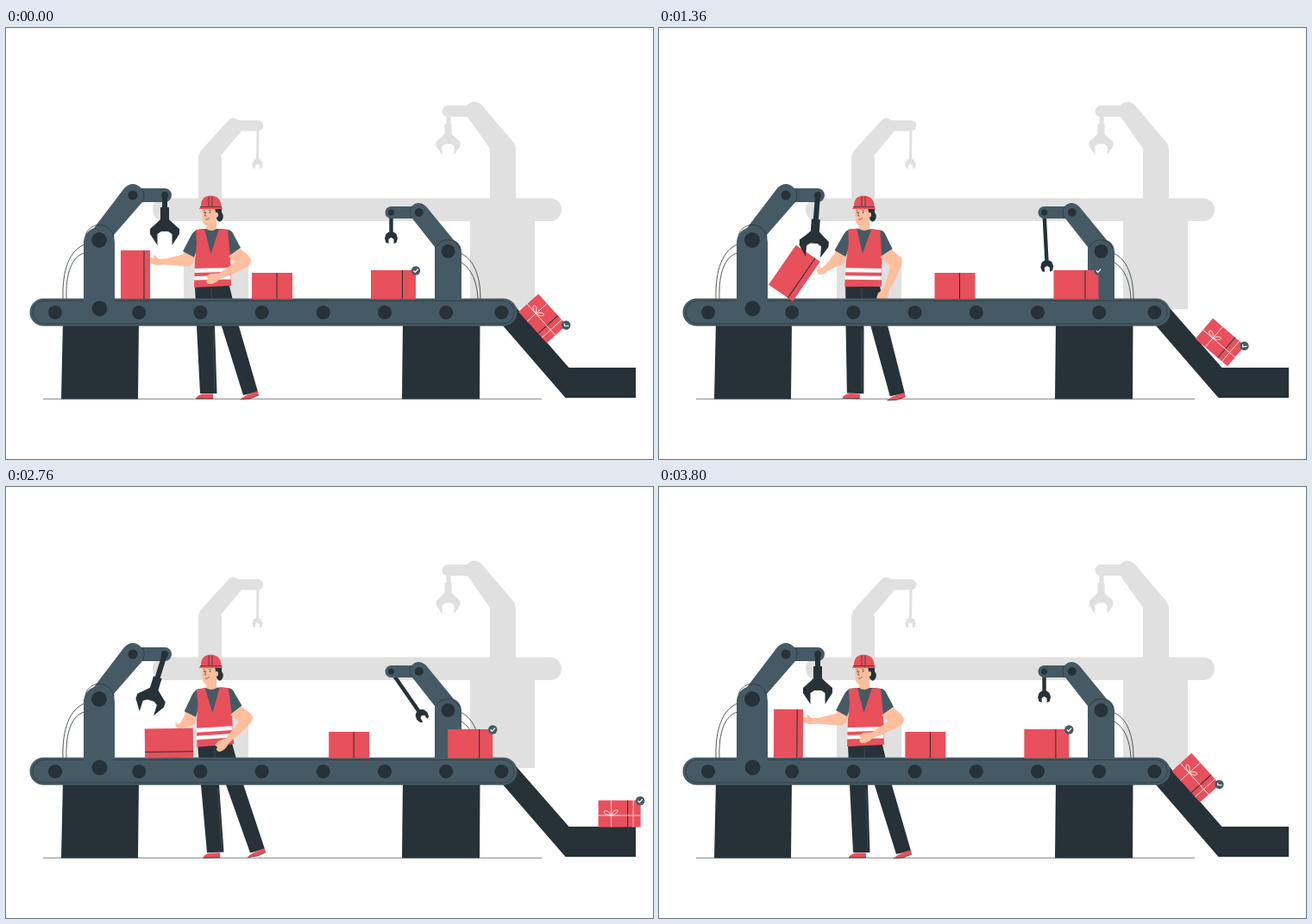
Recreate the animation shown at these times as an HTML page. Size 750x500 px, loop 3840 ms.

```html
<!DOCTYPE html>
<html lang="en">
<head>
<meta charset="utf-8">
<title>Assembly line</title>
<style>
  html, body { margin: 0; width: 100%; height: 100%; overflow: hidden; background: #fff; }
  svg { display: block; width: 750px; height: 500px; }
  .dark { fill: #263238; }
  .slate { fill: #455a64; }
  .red { fill: #e8505b; }
  .pale { fill: #e0e0e0; }
  .skin { fill: #ffbe9d; }
  .white { fill: #fff; }
  .line { fill: none; stroke: #263238; }
  .ribbon { fill: none; stroke: #fff; }
</style>
</head>
<body>
<svg viewBox="0 0 750 500">
  <defs>
    <path id="claw" d="M-5 14H5V28L9 32L17 39V45L8.5 58V45L4 42H-4L-8.5 45V58L-17 45V39L-9 32L-5 28Z"/>
    <path id="jaw" d="M-7.5 1L-6-4Q-3-7 0-7Q3-7 6-4L7.500 1L6 6L3 7V2L0 0L-3 2V7L-6 6Z"/>
    <g id="badge">
      <circle class="slate" r="5.2"/>
      <path class="ribbon" d="M-2.6 0L-.7 1.8L2.7-1.8" stroke-width="1.2"/>
    </g>
  </defs>

  <!-- background machine -->
  <g class="pale">
    <rect x="170" y="197.5" width="474" height="26.5" rx="13.2"/>
    <rect x="206" y="265" width="75" height="52"/>
    <rect x="538" y="220" width="75" height="106"/>
    <path d="M223 200V152Q223 145 228 140L259 106Q263 102 269 107H292A6 6 0 0 1 292 119.500H273L249 148Q250 150 250 153V200Z"/>
    <path d="M290.500 118H293.500L293 153H290Z"/>
    <use href="#jaw" transform="translate(291.5 157.500) scale(.82)"/>
    <path d="M561 200V140L535 103H512A6.500 6.500 0 0 1 512 90H534Q543 81 552 90L586 130Q591 135 591 142V200Z"/>
    <rect x="510.5" y="102" width="5" height="12"/>
    <use href="#claw" transform="translate(512.5 100) scale(.82)"/>
  </g>

  <path class="line" d="M43 430.3H621" stroke-width=".6"/>

  <!-- worker -->
  <g id="body">
    <path class="dark" d="M219 299H259L270 346L292 422L275 426L250 346L243 322L242 346L244.500 424H225L221 346Z"/>
    <path class="line" d="M238 302L238.500 314M240 350L242 420" style="stroke:#455a64" stroke-width=".6"/>
    <path class="red" d="M220 430Q221 426 228 424.500H240V430ZM272 431Q275 427 284 424L292 421L293 426L283 430Z"/>
    <path class="line" d="M220 430H240M272 431L283 430L293 426" stroke-width=".7"/>
    <path class="skin" d="M207 257L220 260L217 273Q212 279 206 275Q202 271 205 264Z"/>
    <path id="reach" class="skin" d="M-1-7L-23-1.500L-32-1L-36-5Q-39-6-37-2L-42-3V4L-35 6L-25 5.500L0 7.500Q7 6 7-1Z"/>
    <path class="slate" d="M222 234L230 233H249L258 234Q262 235 264 240L272 255L258 265L250 270H225L223 252L218 266L205 259L215 240Q218 235 222 234Z"/>
    <path class="red" d="M220 234L230 233L237.500 262L247 233L257 234L260 265L261 299L218 301L219 270L221 250Z"/>
    <path class="white" d="M218.500 279L260 278.200V283L218.400 284ZM218.300 288L260.500 287V291.500L218.200 292.500Z"/>
    <path class="skin" d="M258 265L271.500 256L281 264L278 276L268 273Z"/>
    <path id="forearm" class="skin" d="M281 264Q287 270 281 276Q272 282 248 291Q242 298 234 297L232 294L234 291L232 288L237 285L247 284.500L267 271L272 262Z"/>
  </g>

  <!-- head -->
  <path class="skin" d="M233 222H244V233Q238 237 232 233Z"/>
  <path class="dark" d="M241 208H250V214Q253 217 251 222Q248 227 245 223L243 219Z"/>
  <path class="skin" d="M227 208H242L243 214Q246 213 246 217Q246 220 243 220Q242 228 235 229Q229 230 228 224Z"/>
  <path class="line" d="M228.500 212L230.500 211.500M235 211.500L238 212M232 213L230.500 218H232.500M231 222Q234 223 236 220" stroke-width=".6"/>
  <circle class="dark" cx="230" cy="214" r=".8"/>
  <circle class="dark" cx="236.5" cy="214" r=".8"/>
  <path class="red" d="M226 206Q226 195 237 194.500Q249 195 249.500 206L251 210H224Z"/>
  <path class="line" d="M225 207.500H250M235 207V195.500M239 207V195.500" stroke-width=".7"/>

  <!-- cables -->
  <path class="line" d="M66 314C65 280 74 258 91 251M70 314C69 285 76 265 91 261M550 314C550 288 542 268 528 262M547 314C546 294 540 280 528 272" stroke-width=".8"/>

  <!-- supports and chute -->
  <path class="dark" d="M66 340H154L153 430.500H64ZM460 340H549.500L549 430.500H459ZM586 318L652.500 394H730V429H648.500L574 343Z"/>

  <!-- gift on the chute -->
  <g id="gift">
    <rect class="red" x="-24.5" y="-15.5" width="49" height="31"/>
    <path class="line" d="M9.500-15.500V15.500"/>
    <path class="ribbon" d="M-9.500-15.500V15.500M-24.500 2H24.500M16-15.500V15.500M-9.500 2Q-19 1-18-3Q-14-5-9.500 2Q-6-6-2-4Q-2 0-9.500 2" stroke-width=".8"/>
    <use href="#badge" x="24" y="-15"/>
  </g>

  <!-- conveyor -->
  <rect class="slate" x="27.500" y="313.700" width="565" height="32" rx="16"/>
  <rect class="line" x="31" y="316.500" width="558" height="26.500" rx="13" stroke-width=".6"/>
  <g id="rollers" class="dark"></g>

  <!-- robot arms -->
  <g id="wrench" class="dark">
    <path id="wrenchRod"/>
    <use id="wrenchJaw" href="#jaw"/>
  </g>
  <g class="slate">
    <path d="M90 326V249A18 18 0 0 1 102 232L137 186Q147 176 157 186H184A8 8 0 0 1 184 202H158L125 240L126 249V326Z"/>
    <path d="M497 316V254L471 221H446.500A7 7 0 0 1 446.500 207H470Q478 199 487 207L519 246A15.500 15.500 0 0 1 528 260V316Z"/>
  </g>
  <path class="line" d="M92 240A17 17 0 0 1 125 243M158 186Q162 194 158 202M499 254A14.500 14.500 0 0 1 526 256M470 207Q466 214 470 221" stroke-width=".7"/>
  <g class="dark">
    <circle cx="108" cy="246" r="9"/>
    <circle cx="108.5" cy="325.5" r="9"/>
    <circle cx="147" cy="194" r="5.5"/>
    <circle cx="512.5" cy="259" r="8"/>
    <circle cx="478.8" cy="214" r="5"/>
  </g>

  <!-- boxes -->
  <g id="crate">
    <rect class="red" x="-17" y="-28" width="34" height="56"/>
    <path class="line" d="M10-28V28"/>
  </g>
  <g id="belt">
    <path class="red" d="M285 284H332V314.500H285ZM423 281H475V314.500H423Z"/>
    <path class="line" d="M314 284V314.500M459.500 281V314.500"/>
    <use href="#badge" x="475" y="281.5"/>
  </g>

  <g id="gripper" class="dark">
    <path id="gripperRod"/>
    <use id="gripperClaw" href="#claw"/>
  </g>
  <g class="dark">
    <circle cx="184" cy="194" r="4"/>
    <circle cx="446.5" cy="214" r="3.5"/>
  </g>
</svg>
<script>
const LOOP = 3840;
const { sin, cos, min, max, PI } = Math;

const ramp = (x, from, to) => min(1, max(0, (x - from) / (to - from)));
const ease = u => (1 - cos(PI * u)) / 2;
const glide = (x, from, to) => ease(ramp(x, from, to));
const bump = (x, from, to) => sin(PI * ramp(x, from, to));

const $ = id => document.getElementById(id);
const move = (id, transform) => $(id).setAttribute('transform', transform);
const place = (id, x, y, angle) => move(id, `translate(${x} ${y}) rotate(${angle})`);
const rod = (id, halfWidth, length) =>
  $(id).setAttribute('d', `M${-halfWidth} 0H${halfWidth}V${length}H${-halfWidth}Z`);

$('rollers').innerHTML = Array.from({ length: 8 },
  (_, i) => `<circle cx="${i ? 83 + 71.2 * i - (i === 7 ? 7 : 0) : 57}" cy="330" r="8"/>`).join('');

function draw(t) {
  // The belt runs out and back; the tools extend first and retract last.
  const belt = 95 * (glide(t, 760, 2220) - ease(ramp(t, 2260, LOOP) ** 1.6));
  const tool = glide(t, 0, 760) - glide(t, 2880, 3800);

  // The crate tips over with the belt, resting on its lower corner.
  const tilt = min(90, belt), a = tilt * PI / 180;
  place('crate', 150 + 39.5 * (1 - cos(a)),
    314 - 28 * cos(a) - 16.5 * sin(a) + 3 * sin(2 * a), tilt);
  move('belt', `translate(${belt} 0)`);

  // The gift slides down the chute and levels out at its foot.
  place('gift', 622 + belt - 6 * bump(belt, 0, 65), 337 + min(42, .8 * belt),
    48 * (1 - glide(belt, 24, 65)));

  place('gripper', 184, 194, 17 * tool - 33 * bump(t, 1000, 2700) ** 2);
  rod('gripperRod', 3, 15 + 14 * tool);
  move('gripperClaw', `translate(0 ${14 * tool})`);

  const wrenchLength = 29 + 33 * tool;
  place('wrench', 446.5, 214, 17 * tool - .58 * belt);
  rod('wrenchRod', 2.2, wrenchLength - 4);
  move('wrenchJaw', `translate(0 ${wrenchLength})`);

  // The worker sways about the head and follows the crate with one hand.
  const lean = 2.4 * glide(t, 0, 800) - 4.6 * glide(t, 1200, 2000) + 2.2 * glide(t, 3100, 3800);
  const drop = glide(t, 800, 1360) * (1 - glide(t, 1360, 3800));
  move('body', `rotate(${lean} 237 215)`);
  move('forearm', `rotate(${-42 * drop} 276 270)`);
  move('reach', `translate(209 269) rotate(${-42 * bump(tilt, 0, 115)})
    scale(${max(.38, 1 - tilt / 103)} 1)`);
}

const start = performance.now();
function tick() {
  draw((performance.now() - start) % LOOP);
  requestAnimationFrame(tick);
}
tick();
</script>
</body>
</html>
```
